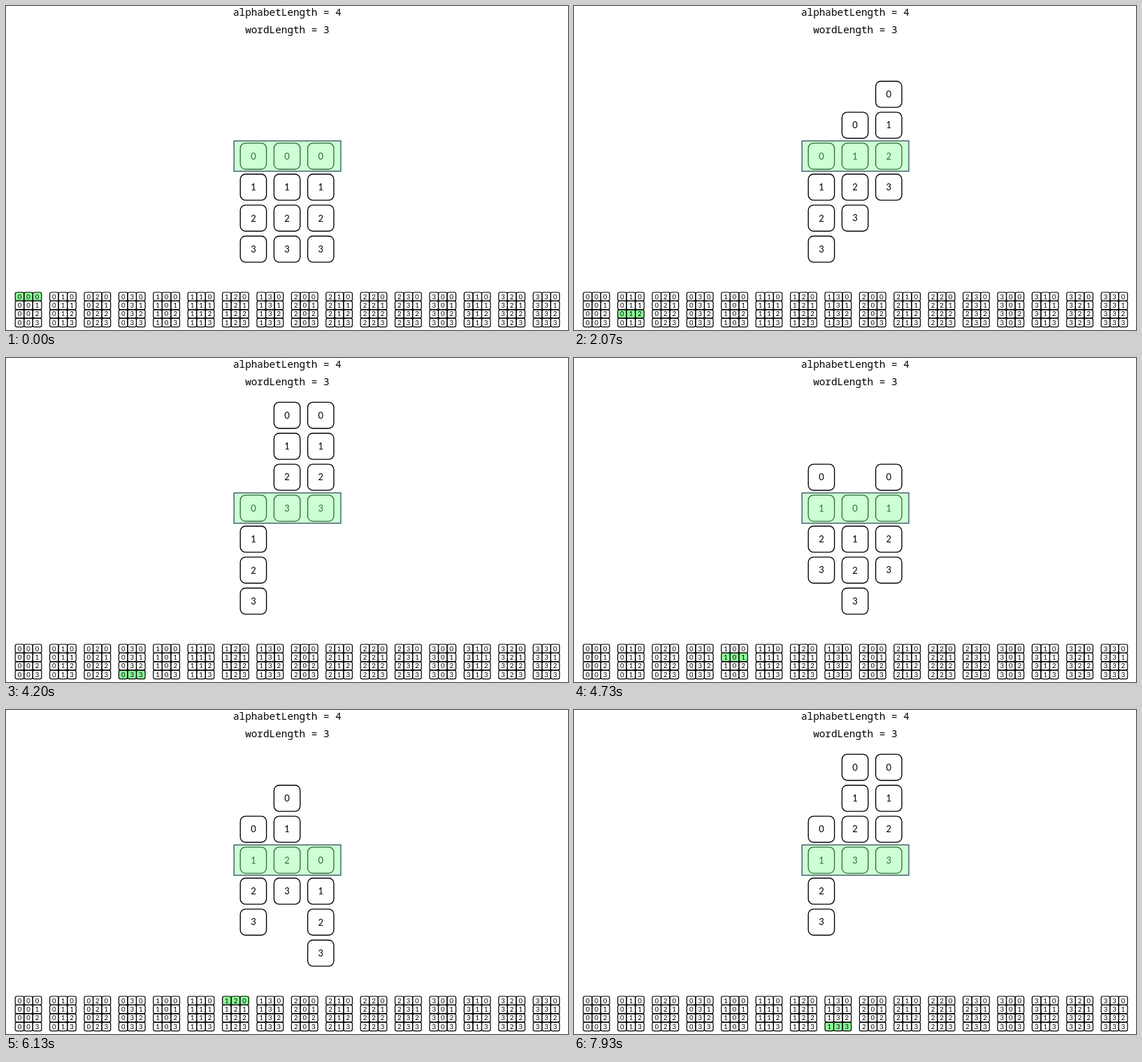
Write an HTML page that moves like this. It is 804 px wide and 464 px high and loops after 8000 ms.

```html
<!DOCTYPE html>
<html lang="en">
<head>
<meta charset="utf-8">
<title>Words over an alphabet</title>
<style>
  html, body { margin: 0; width: 100%; height: 100%; overflow: hidden; background: #fff; }
  svg { display: block; width: 804px; height: 464px; }
  text { text-anchor: middle; fill: #000; }
  .title { font: 14.35px "Noto Sans Mono", monospace; }
  .big { font: 13px Lato, sans-serif; }
  .small { font: 9.6px Lato, sans-serif; }
  .cell { fill: none; stroke: #000; }
</style>
</head>
<body>
<svg id="stage" viewBox="0 0 804 464">
  <text class="title" x="402.4" y="13.8">alphabetLength = 4</text>
  <text class="title" x="402.4" y="39.2">wordLength = 3</text>
</svg>
<script>
const NS = "http://www.w3.org/2000/svg";
const stage = document.getElementById("stage");
const ALPHABET = 4, LETTERS = 3;
const LOOP = 8000, FIRST = 850, STEP = 229, LAST_WORD = 31;
const ROW = 44.35, COL = 48.2;
const GROUP = 49.4, CELL_W = 12.55, CELL_H = 12.4, LEFT = 13.2, TOP = 410;

function add(parent, tag, attrs, text) {
  const node = document.createElementNS(NS, tag);
  for (const key in attrs) node.setAttribute(key, attrs[key]);
  if (text !== undefined) node.textContent = text;
  return parent.appendChild(node);
}

function addCell(parent, x, y, w, h, r, stroke, style, drop, digit) {
  add(parent, "rect", { class: "cell", x, y, width: w, height: h, rx: r, "stroke-width": stroke });
  add(parent, "text", { class: style, x: x + w / 2, y: y + h / 2 + drop }, digit);
}

const digitsOf = word => [word >> 4, (word >> 2) & 3, word & 3];

// Three wheels of digits, moved so that the chosen row sits in the window.
const wheels = [];
for (let i = 0; i < LETTERS; i++) {
  const wheel = add(stage, "g", {});
  for (let d = 0; d < ALPHABET; d++) {
    addCell(wheel, 335.2 + i * COL, 196.4 + d * ROW, 37.4, 37.4, 7.5, 1.35, "big", 4.7, d);
  }
  wheels.push(wheel);
}
add(stage, "rect", {
  x: 326.2, y: 193.2, width: 152.8, height: 43.4,
  fill: "#86ff96", "fill-opacity": 0.42, stroke: "#2f5063", "stroke-width": 1.3
});

// All words along the bottom, in blocks of four.
const marker = add(stage, "rect", { width: CELL_W * LETTERS, height: CELL_H, rx: 2.4, fill: "#8bff96" });
const place = word => [LEFT + (word >> 2) * GROUP, TOP + (word & 3) * CELL_H];
for (let word = 0; word < ALPHABET ** LETTERS; word++) {
  const [x, y] = place(word);
  digitsOf(word).forEach((d, i) =>
    addCell(stage, x + i * CELL_W, y, CELL_W, CELL_H, 2.4, 1.2, "small", 3.4, d));
}

function draw(time) {
  const word = Math.max(0, Math.min(LAST_WORD, Math.floor((time - FIRST) / STEP) + 1));
  digitsOf(word).forEach((d, i) => wheels[i].setAttribute("transform", `translate(0 ${-d * ROW})`));
  const [x, y] = place(word);
  marker.setAttribute("x", x);
  marker.setAttribute("y", y);
}

const start = performance.now();
function tick() {
  draw((performance.now() - start) % LOOP);
  requestAnimationFrame(tick);
}
tick();
</script>
</body>
</html>
```
